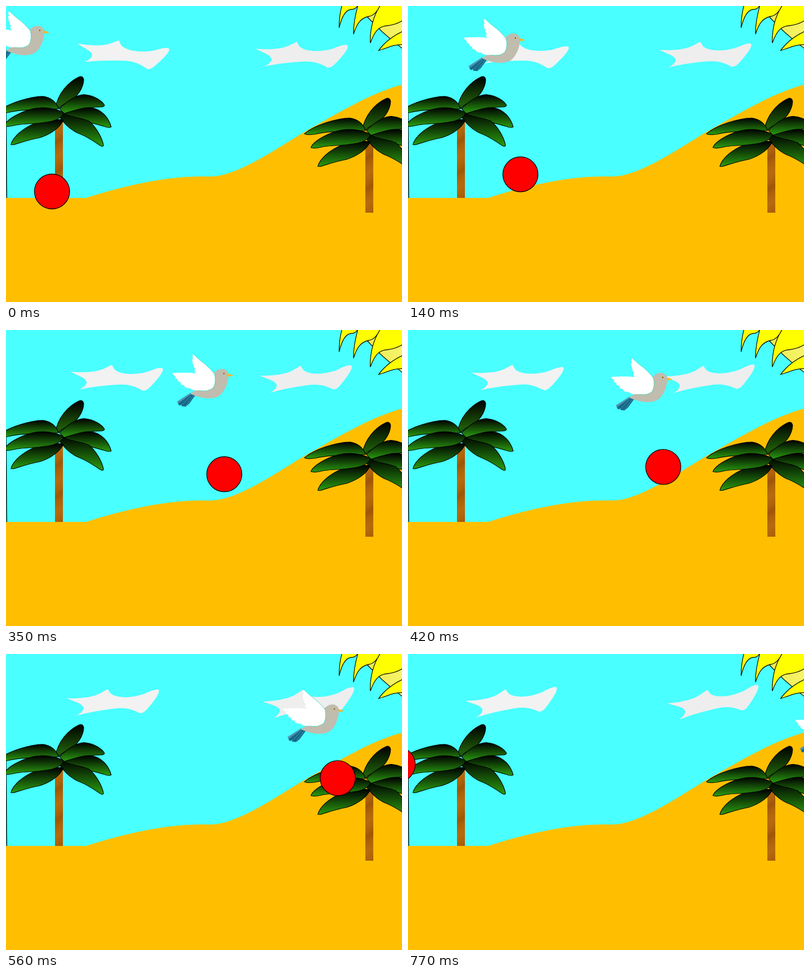
Write an HTML page that moves like this. It is 800 px wide and 600 px high and loops after 840 ms.

```html
<!DOCTYPE html>
<html lang="en">
<head>
<meta charset="utf-8">
<title>Beach</title>
<style>
html, body { margin: 0; width: 100%; height: 100%; overflow: hidden; }
svg { display: block; width: 800px; height: 600px; background: #4affff; }
.leaves path { stroke: #000; stroke-width: 1.2; }
.rays path { fill: #ff0; stroke: #000; stroke-width: 1.3; }
</style>
</head>
<body>
<svg viewBox="0 0 800 600">
  <defs>
    <linearGradient id="leaf" x2="0" y2="1">
      <stop offset="0" stop-color="#000"/><stop offset="1" stop-color="#2a9c10"/>
    </linearGradient>
    <linearGradient id="darkLeaf" x2="0" y2="1">
      <stop offset="0" stop-color="#000"/><stop offset=".85" stop-color="#1f5c0a"/>
    </linearGradient>
    <linearGradient id="bark" gradientUnits="userSpaceOnUse" x2="14" y2="22" spreadMethod="reflect">
      <stop offset="0" stop-color="#b86a0c"/><stop offset=".6" stop-color="#ae6108"/><stop offset="1" stop-color="#9e5506"/>
    </linearGradient>
    <linearGradient id="disc">
      <stop offset="0" stop-color="#e8e850"/><stop offset="1" stop-color="#f8f468"/>
    </linearGradient>
    <path id="cloud" transform="translate(-237 -81.5)" d="M144 76C167 80 194 82 211 76Q219 73 228 69.500Q231 77 233 80C245 92 275 95 300 90C310 87 317 85 325 85Q331 85 329.500 90C327 98 312 112 299 123Q290 130 284 127C273 119 260 112 240 111C215 110 185 110 158 113.500Q172 108 174 101C174 91 160 87 144 76Z"/>
    <g id="leaves" class="leaves" fill="url(#leaf)">
      <path fill="url(#darkLeaf)" d="M100 206C105 178 125 154 148 143.500Q156 141 157 150C156 168 143 186 125 195Q112 201 106 208Z"/>
      <path d="M108 208C123 194 140 180 158 179.500C178 181 194 192 199 201Q199 205 187 205C165 205 142 211 117 218Z"/>
      <path d="M-17 215C2 198 48 183 75 183Q99 187 106 208C85 212 38 207 4 216Q-12 218 -17 215Z"/>
      <path d="M117 218C140 211 155 205 172 206C194 209 208 228 212.500 245Q209 248 198 244C176 237 142 231 117 218Z"/>
      <path d="M107 214C125 225 150 226 167 233C181 243 195 268 197 283Q195 287 186 280C174 272 160 263 146 258C132 252 120 242 107 224Z"/>
      <path d="M10 281C14 265 35 247 60 237C80 230 101 229 116 231C109 247 90 260 68 267C46 271 27 278 14 281.500Z"/>
      <path d="M-4 243C0 231 30 213 55 208C75 204 101 207 116 216Q114 227 94 233C70 239 45 238 22 241Q3 246 -4 243Z"/>
    </g>
  </defs>

  <path fill="#ffbf00" d="M0 389H162C243 362 328 346 390 345.500H415C470 345 560 280 603 255.500C660 223 739 175 800 159.500V600H0Z"/>
  <path stroke="#000" stroke-width="1.500" d="M0 215L1.500 389"/>

  <path fill="url(#disc)" stroke="#000" stroke-width="1.300" d="M720 0Q724 16 730 22Q763 58 802 87V0Z"/>
  <g class="rays">
    <path d="M802 51Q770 66 753 90C775 84 778 79 802 78Z"/>
    <path d="M756 -2C742 21 735 45 736 75C744 53 752 41 770 40Q788 38 802 29V-2Z"/>
    <path d="M711 -2C706 18 702 35 702 57C709 36 715 25 733 21Q747 19 756 -2Z"/>
    <path d="M679 -2C675 12 673 26 673 44C678 23 685 8 697 7Q707 7 711 -2Z"/>
  </g>

  <path fill="url(#bark)" d="M99 232H115V389H99Z"/>
  <path fill="url(#bark)" d="M726 276H742V419H726Z"/>
  <use href="#leaves"/>
  <use href="#leaves" x="620" y="44"/>

  <use id="cloudLeft" href="#cloud" fill="#f2f2f2"/>
  <use id="cloudRight" href="#cloud" fill="#eee"/>

  <g id="bird">
    <path fill="#4f93b3" d="M150 104L122 122L125 126L133 124L158 108Z"/>
    <path fill="#156a88" d="M153 105L124 126L127 130L132 128L131 131L140 132L147 126L160 108Z"/>
    <path stroke="#4f93b3" d="M151 109L132 129M156 109L140 131"/>
    <path fill="#f5b820" d="M225 65L237 69Q231 71 225 71Z"/>
    <path fill="#c0bcae" d="M195 66C201 58 209 55 217 56Q226 59 226 68C227 82 218 104 206 111C190 119 170 115 149 106Q170 94 195 66Z"/>
    <path fill="#fff" stroke="#40dcc0" d="M155 26Q164 34 170 39Q187 51 198 66Q202 80 196 93C187 102 173 101 155 97L160 64Z"/>
    <path fill="#fff" d="M155 26Q152 30 155 35Q151 37 154 41Q153 45 156 48Q155 52 159 55Q156 59 160 65C145 62 128 64 113 64Q114 69 120 71Q115 73 124 77Q121 80 130 83Q127 87 137 89Q136 94 149 95Q153 100 165 99H185L195 70L175 45Z"/>
    <circle cx="217" cy="65" r="1.800" fill="#e5b820"/>
    <circle cx="217" cy="65" r="1" fill="#111"/>
  </g>

  <circle id="ball" r="35.500" fill="red" stroke="#000" stroke-width="1.400"/>
</svg>
<script>
const STEP = 70, STEPS = 12;

function place(id, x, y, angle = 0) {
  document.getElementById(id).setAttribute("transform", `translate(${x} ${y}) rotate(${angle})`);
}

function draw(now) {
  const s = Math.floor(now / STEP) % STEPS;
  place("cloudLeft", 237 - 2.6 * s, 81.5, -1.065 * s);
  place("cloudRight", 597.5 + 1.7 * s, 83.5 - 0.15 * s, -5.3 - 0.85 * s);
  place("bird", 74.4 * (s - 2), 7.75 * (s - 2));
  // The ball climbs the dune, then reappears at the left edge.
  const x = 93 + 65.35 * s + 0.85 * s * s;
  place("ball", x > 880 ? x - 935.5 : x, 376 - 17.5 * s + 0.0305 * s ** 3);
  requestAnimationFrame(draw);
}
draw(performance.now());
</script>
</body>
</html>
```
